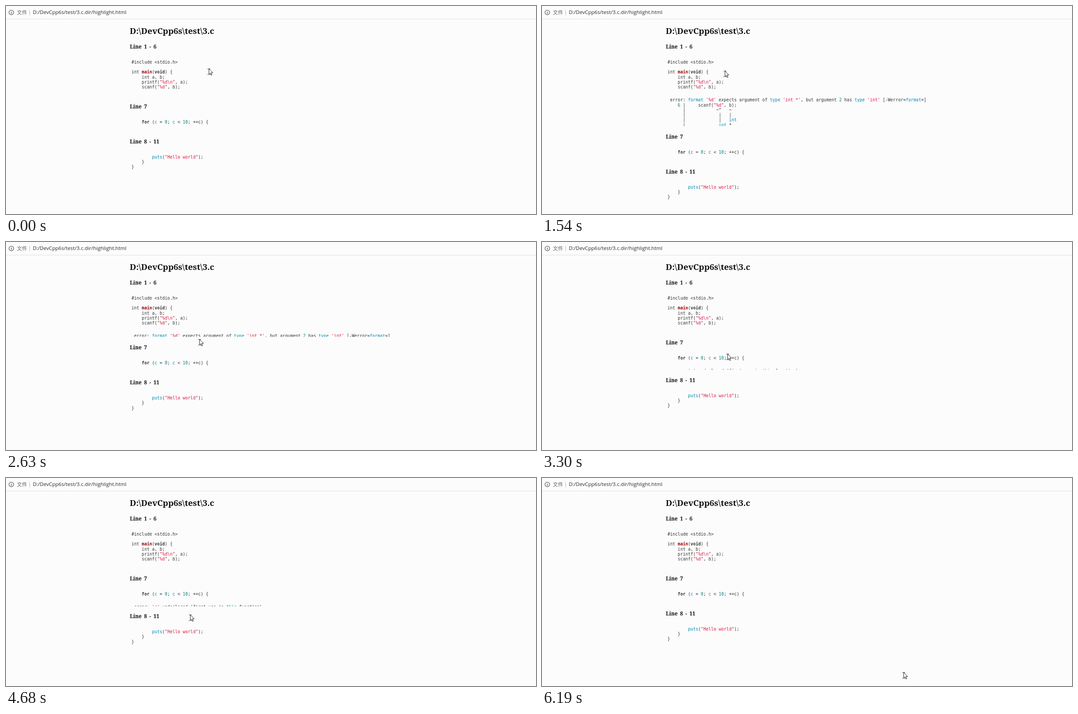
Recreate the animation shown at these times as an HTML page. Size 1195 by 469 pixels, loop 6870 ms.

```html
<!DOCTYPE html>
<html lang="zh">
<head>
<meta charset="utf-8">
<title>highlight.html</title>
<style>
  html, body { margin: 0; width: 100%; height: 100%; overflow: hidden; background: #fcfcfc; }
  #stage { position: relative; width: 1195px; height: 469px; overflow: hidden; color: #333; }
  h1, h2, pre { position: absolute; margin: 0; white-space: pre; }

  .bar { position: absolute; left: 0; top: 0; width: 1195px; height: 29px; border-bottom: 1px solid #dfe0e1; }
  .bar > * { position: absolute; }
  .bar svg { left: 0; top: 0; }
  .bar span { top: 6px; line-height: 16px; white-space: nowrap; }
  .scheme { left: 24.5px; color: #5f6368; font: 11.4px "Noto Sans CJK SC", "Noto Sans CJK", sans-serif; }
  .url { left: 60.5px; color: #2b2c2e; font: 11.6px "Open Sans", "Noto Sans", sans-serif; }
  .bar i { left: 53px; top: 9px; width: 1px; height: 12px; background: #b9bbbe; }

  h1, h2 { color: #111; font-family: "Noto Serif", serif; font-weight: 700; }
  h1 { left: 279px; top: 43px; font-size: 18.8px; line-height: 26px; }
  h2 { left: -.7px; top: 14.6px; font-size: 11.8px; line-height: 16px; word-spacing: 2.4px; }

  pre { left: 3px; top: 52.6px; font: 9.6px/11.25px "DejaVu Sans Mono", monospace; }
  .fn { color: #900; }
  .s { color: #d14; }
  .n { color: #008080; }
  .k { color: #0086b3; }

  /* Each panel grows between two sections and pushes the rest down */
  main { position: absolute; left: 280px; top: 68.4px; width: 620px; }
  section { position: relative; height: 79px; }
  section:first-child { height: 135px; }
  .panel { position: relative; height: 0; overflow: hidden; }
  .panel pre { top: 3.1px; }

  .panel, #cursor, #cursor path { animation: 6870ms infinite paused; }
  #format { animation-name: format; }
  #undeclared { animation-name: undeclared; }
  @keyframes format {
    0%, 11.86% { height: 0; }
    26.42%, 30.06% { height: 72px; }
    44.61%, 100% { height: 0; }
  }
  @keyframes undeclared {
    0%, 46.11% { height: 0; }
    60.35% { height: 36px; }
    74.91%, 100% { height: 0; }
  }

  #cursor { position: absolute; width: 12px; height: 18px; overflow: visible;
    animation-name: move; animation-timing-function: linear; }
  #arrow { animation-name: arrow; animation-timing-function: step-end; }
  #beam { animation-name: beam; animation-timing-function: step-end; }
  @keyframes move {
    0% { left: 457px; top: 141px; }
    6% { left: 412px; top: 124px; }
    10%, 30% { left: 412px; top: 146px; }
    32% { left: 438px; top: 163px; }
    34% { left: 455px; top: 185px; }
    42%, 66.5% { left: 418px; top: 252px; }
    68% { left: 415px; top: 308px; }
    76%, 87.9% { left: 408px; top: 354px; }
    88%, 100% { left: 815px; top: 438px; }
  }
  @keyframes arrow {
    0%, 68% { opacity: 1; }
    42%, 90%, 100% { opacity: 0; }
  }
  @keyframes beam {
    0%, 68%, 100% { opacity: 0; }
    42% { opacity: 1; }
  }
</style>
</head>
<body>
<div id="stage">
  <div class="bar">
    <svg width="26" height="28" fill="none" stroke="#44474a" stroke-width="1.1">
      <circle cx="12" cy="14.5" r="5.2"/>
      <path d="M12 13.6V17.4M12 11.4V12.6" stroke-width="1.3"/>
    </svg>
    <span class="scheme">文件</span><i></i>
    <span class="url">D:/DevCpp6s/test/3.c.dir/highlight.html</span>
  </div>

  <h1>D:\DevCpp6s\test\3.c</h1>
  <main>
    <section>
      <h2>Line 1 - 6</h2>
      <pre>#include &lt;stdio.h&gt;

int <b class="fn">main</b>(<b>void</b>) {
    int a, b;
    printf(<span class="s">"%d\n"</span>, a);
    scanf(<span class="s">"%d"</span>, b);</pre>
    </section>
    <div class="panel" id="format"><pre> error: <span class="k">format</span> <span class="s">'%d'</span> expects argument of <span class="k">type</span> <span class="s">'int *'</span>, but argument <span class="n">2</span> has <span class="k">type</span> <span class="s">'int'</span> [-Werror=<span class="k">format</span>=]
    <span class="n">6</span> |     scanf(<span class="s">"%d"</span>, b);
      |            ~^   ~
      |             |   |
      |             |   <span class="k">int</span>
      |             <span class="k">int</span> *</pre></div>

    <section>
      <h2>Line 7</h2>
      <pre>    <b>for</b> (<span class="k">c</span> = <span class="n">0</span>; <span class="k">c</span> &lt; <span class="n">10</span>; ++c) {</pre>
    </section>
    <div class="panel" id="undeclared"><pre> error: <span class="s">'c'</span> undeclared (first use in <span class="k">this</span> function)
    <span class="n">7</span> |     <b>for</b> (<span class="k">c</span> = <span class="n">0</span>; <span class="k">c</span> &lt; <span class="n">10</span>; ++c) {
      |          ^</pre></div>

    <section>
      <h2>Line 8 - 11</h2>
      <pre>        <span class="k">puts</span>(<span class="s">"Hello world"</span>);
    }
}</pre>
    </section>
  </main>

  <svg id="cursor">
    <path id="arrow" d="M.5 .5V13L3.4 10.3L5.4 15.2L7.4 14.3L5.4 9.6H9.3Z" fill="#fff" stroke="#222"/>
    <path id="beam" d="M-2.5 .5H-.3M1.3 .5H3.5M.5 1V13M-2.5 13.5H-.3M1.3 13.5H3.5" fill="none" stroke="#222"/>
  </svg>
</div>

<script>
const LOOP = 6870, STEP = 137.5;
const animations = document.getAnimations();
const start = performance.now();

function frame() {
  const now = Math.max(0, performance.now() - start) % LOOP;
  const time = Math.floor(now / STEP) * STEP;
  for (const animation of animations) animation.currentTime = time;
  requestAnimationFrame(frame);
}
frame();
</script>
</body>
</html>
```
